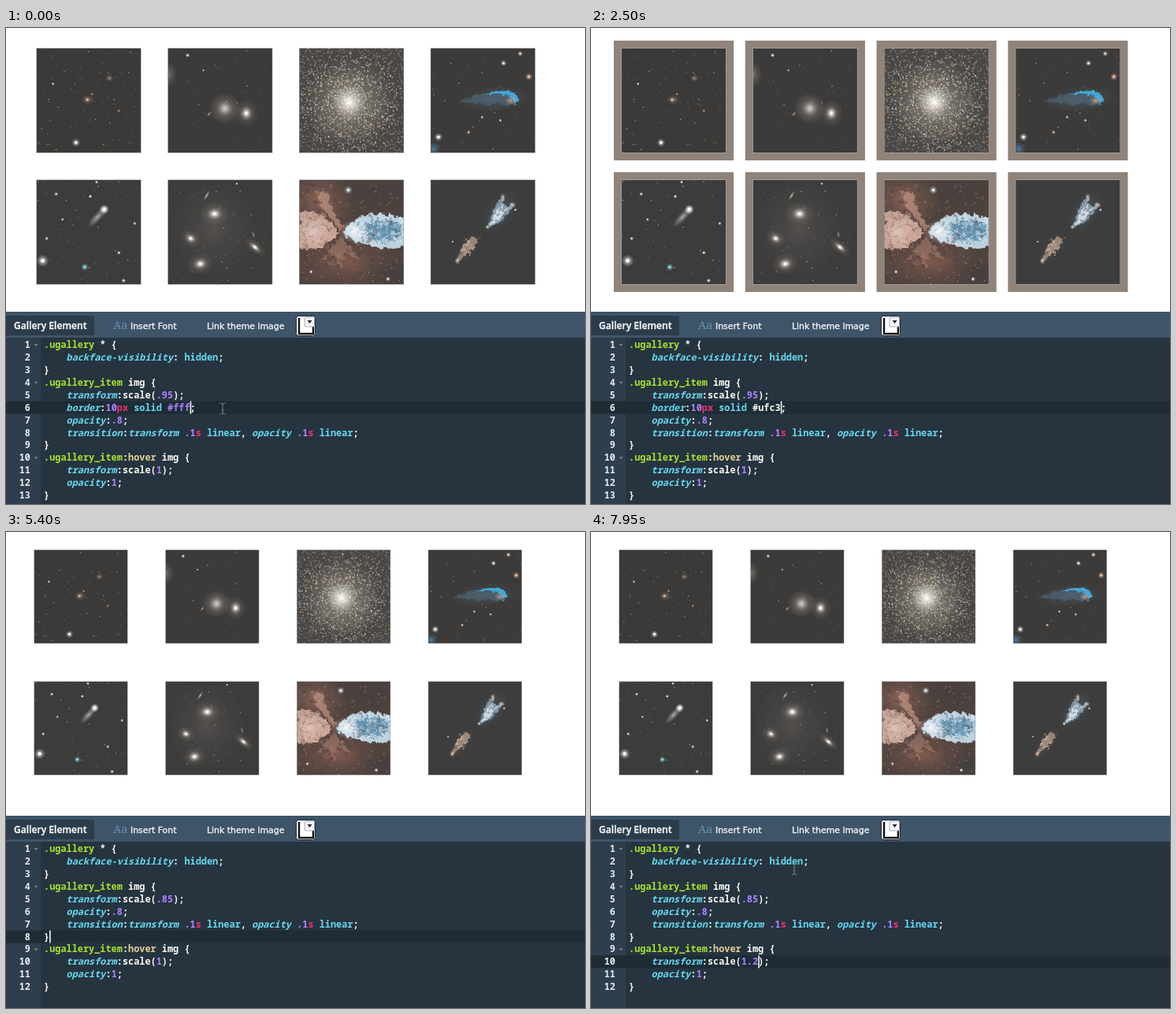
Animation of 735 by 604 pixels, one loop 8000 ms. Source, as an HTML page:

```html
<!DOCTYPE html>
<html lang="en">
<head>
<meta charset="utf-8">
<title>Gallery style editor</title>
<style>
  html, body { margin: 0; width: 100%; height: 100%; overflow: hidden; background: #fff; }
  svg { display: block; width: 100vw; height: 100vh; }
  .code text { font: 600 11.9px "Noto Sans Mono", "DejaVu Sans Mono", monospace; white-space: pre; }
  .bar text { font: 10.9px "DejaVu Sans", sans-serif; fill: #f4f6f8; stroke: #f4f6f8; stroke-width: .35px; }
  .bar .tab { font: 600 12.1px "Open Sans", sans-serif; }
  .bar .aa { font: 14.5px "Noto Serif", serif; fill: #6590ae; stroke: none; }
  .w { fill: #f8f8f2; } .g { fill: #a6e22e; } .h { fill: #e2d092; }
  .c { fill: #66d9ef; } .p { fill: #66d9ef; font-style: italic; }
  .n { fill: #ae81ff; } .r { fill: #f0306a; }
  .num { fill: #e6eaec; }
</style>
</head>
<body>
<svg id="stage" viewBox="0 0 735 604" preserveAspectRatio="none">
  <defs id="defs">
    <clipPath id="crop"><rect width="132" height="132"/></clipPath>
    <filter id="rough" x="-20%" y="-20%" width="140%" height="140%" color-interpolation-filters="sRGB">
      <feTurbulence type="fractalNoise" baseFrequency=".16" numOctaves="3" seed="4"/>
      <feDisplacementMap in="SourceGraphic" scale="9" xChannelSelector="R" yChannelSelector="G"/>
      <feGaussianBlur stdDeviation=".7"/>
    </filter>
  </defs>
  <rect width="735" height="604" fill="#fff"/>
  <g id="gallery"></g>
  <g class="bar">
    <rect y="360" width="735" height="244" fill="#263440"/>
    <rect y="360" width="735" height="33" fill="#3e5468"/>
    <path d="M0 365H109q3 0 3 3V390H0z" fill="#2c3c4b"/>
    <text class="tab" x="10" y="382">Gallery Element</text>
    <text class="aa" x="136" y="382">Aa</text>
    <text x="158" y="381.5">Insert Font</text>
    <text x="255" y="381.5">Link theme image</text>
    <rect x="368.5" y="365.5" width="24" height="25" rx="3" fill="#fff" stroke="#1c262e"/>
    <path d="M372 368V388H390V379" fill="none" stroke="#111" stroke-width="2.4"/>
    <rect x="379" y="367" width="12.5" height="12" rx="1" fill="#f3f3fb" stroke="#9a9cae" stroke-width=".8"/>
    <path d="M382.5 371h6l-3 4z" fill="#222"/>
    <rect y="393" width="44" height="211" fill="#2e3e4c"/>
  </g>
  <g class="code">
    <rect id="active" width="735" height="16" fill="#1d2c35"/>
    <rect id="select" x="48" width="200" height="16" fill="#444641"/>
    <g id="lines"></g>
    <rect id="caret" width="1.6" height="16" fill="#f8f8f0"/>
  </g>
  <path id="beam" d="M-3.5-7Q0-7 0-4.5Q0-7 3.5-7M0-5V5M-3.5 7Q0 7 0 4.5Q0 7 3.5 7M-1.5 2h3" fill="none" stroke="#6f7d74" stroke-width="1.1"/>
  <path id="arrow" d="M0 0V15l3.6-3.3 2.6 5.6 2.3-1-2.6-5.5H11z" fill="#111" stroke="#fff"/>
</svg>
<script>
const $ = id => document.getElementById(id);
const LOOP = 8000, CHAR = 7.14, ROW = 15.93, TOP = 394, LEFT = 48;

// ---- sky pictures, each 132 x 132 ----
let seed = 7;
const rnd = () => (seed = (seed * 16807) % 2147483647) / 2147483647;
const hues = {};
const hue = c => {
  const id = 'g' + c.slice(1);
  hues[id] = `<radialGradient id="${id}"><stop stop-color="${c}"/><stop offset=".4" stop-color="${c}" stop-opacity=".45"/><stop offset="1" stop-color="${c}" stop-opacity="0"/></radialGradient>`;
  return `url(#${id})`;
};
const glow = (x, y, rx, ry, c, angle = 0, o = 1) =>
  `<ellipse transform="translate(${x} ${y}) rotate(${angle})" rx="${rx}" ry="${ry}" fill="${hue(c)}" opacity="${o}"/>`;
const star = (x, y, r, c = '#ffffff') =>
  glow(x, y, r * 2.4, r * 2.4, c) + `<circle cx="${x}" cy="${y}" r="${r * .75}" fill="${c}"/>`;
const galaxy = (x, y, r, angle = 0, flat = .8) =>
  glow(x, y, r * 1.9, r * 1.9 * flat, '#7d746a', angle, .6) +
  glow(x, y, r, r * flat, '#cfc4b6', angle) + glow(x, y, r * .6, r * .6 * flat, '#ffffff', angle) +
  `<circle cx="${x}" cy="${y}" r="${r * .17}" fill="#fff"/>`;
const anywhere = () => [rnd() * 132, rnd() * 132];
const within = (x, y, rx, ry) => () => {
  const a = rnd() * 6.283, d = Math.sqrt(rnd());
  return [x + rx * d * Math.cos(a), y + ry * d * Math.sin(a)];
};
const cluster = () => {
  const a = rnd() * 6.283, d = 62 * rnd() ** 1.1;
  return [63 + d * Math.cos(a), 68 + d * Math.sin(a)];
};
const dots = (n, c, w, o = 1, place = anywhere) => {
  let d = '';
  while (n--) d += 'M' + place().map(v => v.toFixed(1)).join(' ') + 'h.1';
  return `<path d="${d}" stroke="${c}" stroke-width="${w}" stroke-linecap="round" opacity="${o}"/>`;
};
const sky = n => dots(n, '#a08e80', 1.1, .6) + dots(n / 3 | 0, '#c2bab2', 1.6, .6);
const shape = (d, fill, o = 1) => `<path d="${d}" fill="${fill}" opacity="${o}"/>`;
const rough = s => `<g filter="url(#rough)">${s}</g>`;

const pictures = [
  ['#0c0907', () => sky(54) + glow(65, 65, 8, 6, '#8c6a54', 0, .8) + star(64, 65, 1.3, '#e8b898') +
    glow(92, 38, 5, 4, '#8a7c70') + star(50, 119, 2.2) + star(70, 58, .9, '#c08a70') +
    star(104, 79, 1, '#b07a60') + star(21, 45, .9)],
  ['#0c0a09', () => sky(18) + glow(0, 33, 12, 16, '#7d756d', 0, .7) + galaxy(72, 76, 10, 0, 1) +
    glow(72, 76, 22, 20, '#6a635c', 0, .5) + galaxy(99, 82, 8, 0, 1.15) + star(25, 9, 1.2) +
    glow(52, 83, 4, 2, '#c09a80', -50) + star(45, 28, .7)],
  ['#1d1a17', () => dots(650, '#7d7168', 1.5, .75) + dots(240, '#a87850', 1.7, .7) +
    dots(330, '#8fa0a8', 1.6, .65) + glow(63, 68, 56, 56, '#b8ae9c', 0, .7) +
    dots(420, '#d8d0bc', 1.5, .7, cluster) + dots(170, '#c48a50', 1.7, .75, cluster) +
    dots(150, '#5a544c', 1.7, .6, cluster) + dots(200, '#ffffff', 1.3, .85, cluster) +
    glow(63, 68, 21, 21, '#ffffff', 0, .9)],
  ['#0c0a09', () => sky(24) + glow(82, 64, 46, 16, '#2a475a', -5, .6) +
    rough(shape('M34 68Q62 55 92 55Q112 55 111 66Q103 75 88 71Q62 70 34 68', '#223f50', .7) +
      shape('M70 58Q92 48 107 57Q112 66 106 72Q106 62 94 59Q82 60 70 58', '#1490cc')) +
    glow(101, 66, 8, 6, '#d8a088', 0, .8) + star(113, 7, 1.5, '#ffe3c8') + star(92, 19, 1.6) +
    star(124, 36, 2, '#ffb28a') + star(10, 112, 2.2) + star(48, 106, 1.1, '#ffc39c') +
    star(88, 91, .9) + star(65, 87, .9) + glow(4, 127, 9, 9, '#1f608c')],
  ['#0c0c0c', () => sky(34) + glow(77, 47, 17, 5.5, '#b8b8b2', -47, .85) + glow(85, 38, 6, 6, '#ffffff') +
    star(86, 37, 2.4) + star(8, 102, 3.2) + star(61, 110, 2, '#72d8e8') + star(76, 3, 1) +
    star(68, 21, 1.1) + star(25, 18, 1.1) + star(104, 92, 1.1) + star(110, 127, 1.2) +
    star(13, 74, 1.1) + star(33, 50, .9) + star(124, 55, 1)],
  ['#0d0c0b', () => glow(58, 62, 55, 62, '#38332f', 0, .6) + sky(30) + galaxy(59, 43, 10) +
    galaxy(29, 74, 7, 30) + galaxy(41, 106, 9, -10) + galaxy(110, 85, 9, 40, .45) +
    glow(49, 20, 7, 2, '#cfc4b8', -58) + glow(108, 69, 5, 2, '#8d8478', 80) + star(87, 5, .8)],
  ['#22130e', () => glow(26, 26, 46, 38, '#7a4430', 20, .9) + glow(60, 104, 74, 34, '#6a3626', 0, .85) +
    glow(100, 18, 48, 26, '#15100e', 0, .9) + glow(118, 116, 40, 32, '#15100e') +
    rough(shape('M0 42Q26 34 51 66Q30 92 0 86z', '#b98c7c') +
      shape('M20 14L36 16 40 34 56 62 50 62 30 36z', '#a2705a', .8) +
      shape('M55 66Q72 41 100 43Q122 45 140 50V82Q116 90 92 83Q68 80 55 66', '#a9c6d8') +
      shape('M82 54Q108 48 128 56V72Q104 80 88 74z', '#4583a8', .85) +
      shape('M53 72L26 104 44 94 52 112 57 92 78 102z', '#a06a54', .5)) +
    rough(dots(110, '#2c5a78', 3, .6, within(106, 64, 28, 16)) + dots(130, '#e6f2f8', 2.2, .65, within(102, 64, 40, 20)) +
      dots(70, '#6e4638', 3, .5, within(22, 66, 26, 26)) + dots(90, '#e0b8a8', 2, .5, within(22, 64, 24, 24)) +
      dots(100, '#1c100c', 4, .45) + dots(60, '#9a5a44', 3, .4)) +
    glow(70, 65, 20, 15, '#ffffff', 0, .9) + glow(17, 66, 22, 20, '#e9d3c9', 0, .6) +
    dots(60, '#e9b8a4', 1.1, .7) + glow(53, 66, 5, 14, '#6b2c1d', 12, .8) +
    star(62, 13, 2.2, '#d8f4ff') + star(15, 116, 1.1) + star(112, 125, 1.3)],
  ['#0d0d0d', () => glow(88, 40, 32, 17, '#203c50', -55, .75) + glow(46, 87, 24, 11, '#3a2f28', -52, .7) +
    rough(shape('M71 61L80 36 91 20 94 34 105 30Q97 48 80 58z', '#6a8496') +
      shape('M74 57L84 38 91 27 90 40 100 35 84 53z', '#d4e2ea', .85) +
      shape('M33 104L43 80 54 71 62 73 54 86z', '#806858') +
      dots(26, '#3a3c40', 2.4, .6, within(86, 42, 10, 16)) + dots(20, '#d8b698', 1.8, .8, within(48, 85, 9, 11))) +
    glow(91, 22, 3.5, 5, '#ffc7a0') + glow(104, 32, 4, 3.5, '#ffc7a0') + glow(34, 102, 3.5, 5, '#ffd2b2') +
    star(72, 60, 1.1, '#d7d66a') + star(28, 78, .7) + star(107, 38, .9)]
];

$('gallery').innerHTML = pictures.map(([bg, draw]) =>
  `<g><path class="frame" d="M-9.5-9.5H141.5V141.5H-9.5zM0 0V132H132V0z"/><g class="pic" clip-path="url(#crop)">` +
  `<rect width="132" height="132" fill="${bg}"/>${draw()}<rect width="132" height="132" fill="none" stroke="#666"/></g></g>`).join('');
$('defs').insertAdjacentHTML('beforeend', Object.values(hues).join(''));
const tiles = [...$('gallery').children].map(el => ({ el, frame: el.querySelector('.frame'), pic: el.querySelector('.pic') }));

// ---- editing: time, border colour, scale, hover scale, row, column ----
const edits = [
  [0, '#fff', '.95', '1', 6, 26], [250, '#ff', '.95', '1', 6, 25], [350, '#f', '.95', '1', 6, 24],
  [450, '#', '.95', '1', 6, 23], [650, '#u', '.95', '1', 6, 24], [800, '#uf', '.95', '1', 6, 25],
  [950, '#ufc', '.95', '1', 6, 26], [1100, '#ufc1', '.95', '1', 6, 27],
  [1750, '#ufc', '.95', '1', 6, 26], [1850, '#ufc2', '.95', '1', 6, 27],
  [2350, '#ufc', '.95', '1', 6, 26], [2450, '#ufc3', '.95', '1', 6, 27],
  [3550, '#ufc3', '.95', '1', 6, 0], [4000, '', '.95', '1', 5, 25], [4200, '', '.95', '1', 5, 24],
  [4350, '', '.95', '1', 5, 23], [4450, '', '.95', '1', 5, 22], [4600, '', '.5', '1', 5, 21],
  [4900, '', '.85', '1', 5, 22], [5350, '', '.85', '1', 8, 1], [5550, '', '.85', '1', 10, 21],
  [5650, '', '.85', '1.', 10, 22], [5750, '', '.85', '1.1', 10, 23],
  [6550, '', '.85', '1.', 10, 22], [6750, '', '.85', '1.2', 10, 23]
];
const borders = [[0, '#fff'], [1350, '#3d8061'], [2100, '#8f837a'], [2700, '#bab5b1'], [4400, '']];
const last = (list, t) => list.filter(e => e[0] <= t).pop();
const isHex = s => /^#[0-9a-f]{3}$/.test(s);

// Each piece starts with its colour class.
const source = (border, scale, hover) => [
  'g.ugallery|w * {', 'w    |pbackface-visibility|w: |chidden|w;', 'w}',
  'g.ugallery_item|w img {', `w    |ptransform|w:scale(|n${scale}|w);`,
  border && `w    |pborder|w:|n10|rpx|w |csolid|w |${isHex(border) ? 'n' : 'w'}${border}|w;`,
  'w    |popacity|w:|n.8|w;',
  'w    |ptransition|w:|ptransform|w |n.1|rs|w |clinear|w, |popacity|w |n.1|rs|w |clinear|w;', 'w}',
  'g.ugallery_item|w:|hhover|w img {', `w    |ptransform|w:scale(|n${hover}|w);`,
  'w    |popacity|w:|n1|w;', 'w}'
].filter(Boolean);

let shown;
function drawCode(step) {
  if (step === shown) return;
  shown = step;
  $('lines').innerHTML = source(step[1], step[2], step[3]).map((line, i) => {
    const y = TOP + ROW * i + 12;
    const parts = line.split('|').map(p => `<tspan class="${p[0]}">${p.slice(1)}</tspan>`).join('');
    const fold = line.endsWith('{') ? `<path d="M35.5 ${y - 5}h5l-2.5 3z" fill="#75828c"/>` : '';
    return `<text class="num" x="31" y="${y}" text-anchor="end">${i + 1}</text>${fold}<text x="${LEFT}" y="${y}">${parts}</text>`;
  }).join('');
}

// ---- pointer ----
const track = [[6800, 230, 520], [6850, 200, 470], [7000, 100, 100], [7450, 600, 90],
  [7550, 420, 345], [7700, 330, 400], [7950, 258, 428], [8000, 256, 426]];
function pointer(t) {
  if (t < 200) return [275, 483];
  const i = track.findIndex(p => p[0] > t);
  if (i < 1) return null;
  const [a, b] = [track[i - 1], track[i]], k = (t - a[0]) / (b[0] - a[0]);
  return [a[1] + (b[1] - a[1]) * k, a[2] + (b[2] - a[2]) * k];
}
// Share of the last 100 ms spent over a picture, which gives the linear transition.
function hovered(t, x, y) {
  let hits = 0;
  for (let i = 0; i < 10; i++) {
    const p = pointer(t - i * 10);
    if (p && Math.abs(p[0] - x) < 59 && Math.abs(p[1] - y) < 59) hits++;
  }
  return hits / 10;
}

function render(t) {
  const step = last(edits, t), [start, , , , row, col] = step;
  const border = last(borders, t)[1];
  const base = .95 - .1 * Math.min(1, Math.max(0, (t - 5200) / 100));
  tiles.forEach(({ el, frame, pic }, i) => {
    const mid = border ? 80 : 70;
    const x = 25 + 166.8 * (i % 4) + mid, y = 12 + 167 * (i >> 2) + mid;
    const h = t > 6800 ? hovered(t, x, y) : 0;
    const size = 140 * (base + (1.2 - base) * h);
    el.setAttribute('transform', `translate(${x} ${y}) scale(${size / 132}) translate(-66 -66)`);
    frame.setAttribute('fill', border || 'none');
    pic.setAttribute('opacity', .8 + .2 * h);
  });

  drawCode(step);
  const y = TOP + ROW * (row - 1);
  for (const id of ['active', 'select', 'caret']) $(id).setAttribute('y', y);
  $('caret').setAttribute('x', LEFT + col * CHAR);
  $('caret').setAttribute('opacity', (t - start) % 1000 < 500 ? 1 : 0);
  $('select').setAttribute('opacity', col === 0 ? 1 : 0);

  const p = pointer(t), text = p && p[1] > 393;
  $('beam').setAttribute('opacity', text ? 1 : 0);
  $('arrow').setAttribute('opacity', p && !text ? 1 : 0);
  if (p) for (const id of ['beam', 'arrow']) $(id).setAttribute('transform', `translate(${p[0]} ${p[1]})`);
}

const began = performance.now();
function tick(now) {
  render(Math.max(0, now - began) % LOOP);
  requestAnimationFrame(tick);
}
render(0);
requestAnimationFrame(tick);
</script>
</body>
</html>
```
